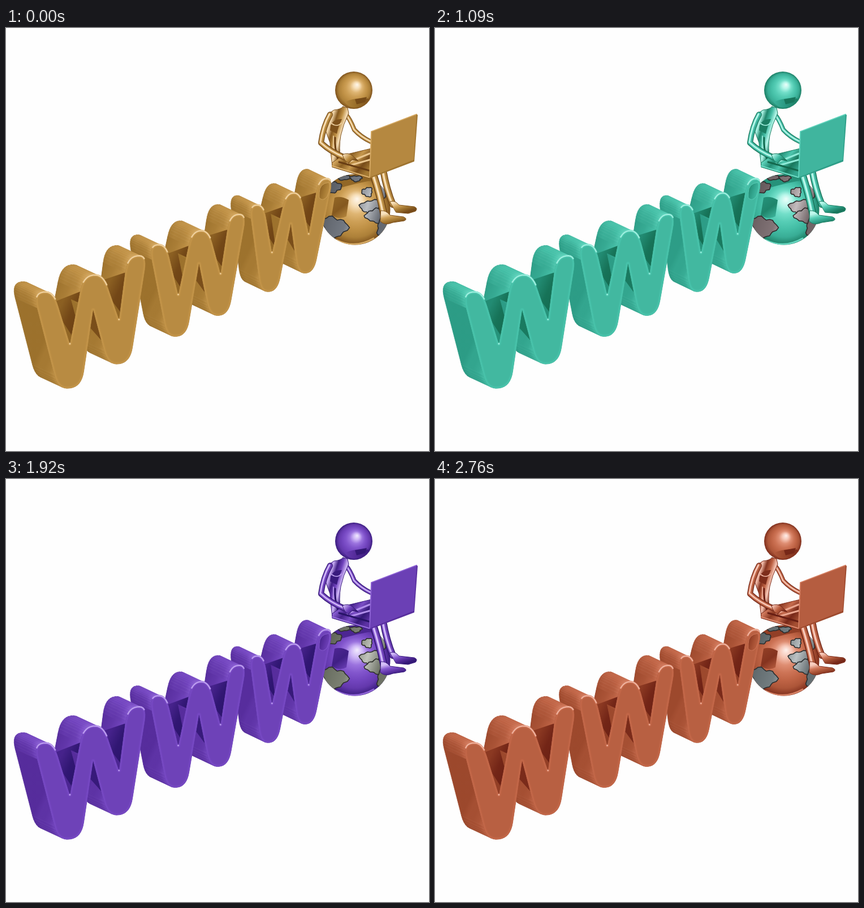
Recreate the animation shown at these times as an HTML page with a canvas. Size 748 by 748 pixels, loop 2920 ms.

```html
<!DOCTYPE html>
<html>
<head>
<meta charset="utf-8">
<style>
html, body { margin: 0; width: 100%; height: 100%; overflow: hidden; background: #fefefe; }
canvas { display: block; width: 748px; height: 748px; }
</style>
</head>
<body>
<canvas id="stage" width="748" height="748"></canvas>
<script>
const g = document.getElementById('stage').getContext('2d');
const LOOP = 2920;
const HUES = [[0, 37], [4, 119], [7, 168], [15, 319], [17, 375]];
let hue;

// Six colour steps per second, on a 10 ms clock.
const stepAt = t => Math.ceil((3 * Math.floor(t / 10) + 25) / 50) - 1;

function hueAt(step) {
  const k = Math.max(1, HUES.findIndex(p => p[0] >= step));
  const [a, h] = HUES[k - 1], [b, j] = HUES[k];
  return h + (j - h) * (step - a) / (b - a);
}

// Metal gains saturation away from its base tone; dark tones lean to the side.
const metal = l => `hsl(${hue - Math.max(0, 38 - l) * .5} ${47 + Math.abs(l - 49) * .9}% ${l}%)`;
const stone = l => `hsl(${hue + 180} 6% ${l}%)`;

const poly = pts => 'M' + pts.map(p => p.join()).join('L') + 'Z';
const mix = (p, q, t) => [p[0] + (q[0] - p[0]) * t, p[1] + (q[1] - p[1]) * t];

function fill(d, paint, edge, width = 1) {
  g.fillStyle = paint;
  g.fill(new Path2D(d));
  if (edge) line(d, edge, width);
}
function line(d, paint, width) {
  g.strokeStyle = paint;
  g.lineWidth = width;
  g.stroke(new Path2D(d));
}
// Evenly spaced tones, either metal or stone.
function tones(grad, list, tint = metal) {
  list.forEach((l, i) => grad.addColorStop(i / (list.length - 1), tint(l)));
  return grad;
}
const linear = (p, q, list, tint) => tones(g.createLinearGradient(...p, ...q), list, tint);

function ball(x, y, r, hx, hy) {
  g.fillStyle = tones(g.createRadialGradient(hx, hy, 0, x, y, r), [96, 84, 66, 57, 51, 45, 30]);
  g.beginPath();
  g.arc(x, y, r, 0, 7);
  g.fill();
}
function limb(d, w) {
  line(d, metal(26), w);
  line(d, metal(47), w * .78);
  g.save();
  g.translate(-w * .1, -w * .08);
  line(d, metal(66), w * .42);
  line(d, metal(88), w * .18);
  g.restore();
}

// Ends and turns of the zigzag, left to right.
const NODES = [[66, 467], [113, 637], [154, 437], [200, 594], [232, 403]];

function outline() {
  const cap = ([x, y], side, w) => [-w, w].map(d => [x + d * side, y - d * side * .14, 27]);
  const corners = [
    ...NODES.flatMap((p, i) => i % 2 ? [[p[0], p[1] - 77, 3]] : cap(p, 1, 17.5)),
    ...cap(NODES[3], -1, 19.5),
    [NODES[2][0], NODES[2][1] + 60, 3],
    ...cap(NODES[1], -1, 20.5)
  ];
  return corners.flatMap((p, i) => {
    const n = corners.length;
    const [a, b] = [corners[(i + n - 1) % n], corners[(i + 1) % n]].map(q => {
      const len = Math.hypot(q[0] - p[0], q[1] - p[1]);
      return mix(p, q, Math.min(p[2] / len, .48));
    });
    return Array.from({ length: 9 }, (_, k) => mix(mix(a, p, k / 8), mix(p, b, k / 8), k / 8));
  });
}
const OUTLINE = outline();

// Letter n shrinks along the row; z runs from the front (0) to the back (1).
function project(n, [x, y], z) {
  const run = n * (203 - 13 * n), dx = x - 107, dy = y - 636;
  return [
    107 + run + .845 ** n * dx - .033 * n * dy + z * (2 * n - 39),
    636 - .483 * run + (.05 - .01 * n) * n * dx + (1 - .058 * n) * dy + z * (.7 * n - 18.2)
  ];
}

function letter(n) {
  const front = OUTLINE.map(p => project(n, p, 0));
  const back = OUTLINE.map(p => project(n, p, 1));
  const face = poly(front);
  const depth = [back[0][0] - front[0][0], back[0][1] - front[0][1]];
  let shine = '';
  front.forEach((p, i) => {
    const j = (i + 1) % front.length;
    const q = front[j], P = back[i], Q = back[j];
    const len = Math.hypot(q[0] - p[0], q[1] - p[1]) || 1;
    const nx = (q[1] - p[1]) / len, ny = (p[0] - q[0]) / len;
    if (ny < -.45) shine += `M${p}L${q}`;
    if (nx * depth[0] + ny * depth[1] <= 0) return;
    const inner = len > 40 && ny < 0;
    const l = 43 + (ny < 0 ? -9 : -3) * ny;
    const paint = linear(p, P, inner ? [25, 27, 34] : [l + 9, l + 2, l, l, l - 3]);
    fill(poly([p, q, Q, P]), paint, paint, .8);
    if (inner) {
      fill(poly([p, mix(p, q, .15), mix(P, Q, .5), P]), metal(36));
      fill(poly([q, Q, mix(Q, P, .4)]), linear(q, Q, [52, 44, 40]));
    }
  });
  fill(poly([[154, 497], [147, 528], [171, 555]].map(p => project(n, p, 0))), metal(29));
  fill(face, metal(49));
  g.save();
  g.clip(new Path2D(face));
  line(face, metal(51), 7);
  line(face, metal(54), 3);
  g.restore();
  line(face, metal(46), .6);
  line(shine, metal(66), 3.2);
  line(shine, metal(82), 1.3);
}

// A ragged patch of land.
function land(x, y, rx, ry, paint) {
  const pts = Array.from({ length: 26 }, (_, i) => {
    const a = i * Math.PI / 13;
    const r = 1 + .17 * Math.sin(3 * a + x) + .1 * Math.sin(7 * a + y);
    return [x + rx * r * Math.cos(a), y + ry * r * Math.sin(a)];
  });
  fill(poly(pts), paint, stone(17), 1.6);
}

function globe() {
  ball(617, 321, 62.5, 621, 302);
  g.save();
  g.beginPath();
  g.arc(617, 321, 62.5, 0, 7);
  g.clip();
  fill('M581,300Q592,296 606,304L602,333Q590,340 576,331Z', linear([580, 300], [606, 335], [36, 32, 50]));
  fill('M566,270Q610,250 660,268Q625,272 580,286Z', metal(36));
  const paint = linear([560, 290], [665, 325], [34, 42, 48, 75, 42], stone);
  land(580, 353, 22, 19, paint);
  land(645, 317, 17, 13, paint);
  land(652, 332, 15, 12, paint);
  land(639, 290, 9, 8, paint);
  land(667, 354, 11, 15, paint);
  land(580, 281, 12, 10, paint);
  land(598, 264, 11, 5, paint);
  land(619, 266, 10, 5, paint);
  land(664, 285, 9, 16, paint);
  line('M585,375Q617,391 650,372', metal(62), 3);
  g.restore();
}

function person() {
  // Far arm, legs and feet
  limb('M601,153Q608,160 616,180Q628,193 645,201', 8);
  limb('M667,252Q673,286 684,312', 12);
  fill('M679,307Q688,304 695,313L722,316Q729,319 724,324L711,328L690,326Z', linear([690, 308], [697, 329], [84, 58, 40, 28]), metal(30));
  limb('M650,260Q661,294 668,329', 13);
  fill('M663,323Q672,322 679,331L703,334Q711,338 704,341L684,344Q670,350 662,342Z', linear([680, 326], [685, 347], [86, 58, 42, 28]), metal(30));

  // Torso
  fill('M596,139L604,141L606,151Q596,171 592,190Q588,211 592,237L577,244Q574,222 573,203L563,176Q562,154 580,145Q592,144 596,139Z',
    linear([564, 170], [602, 182], [46, 82, 32, 50, 84, 34]), metal(30));
  fill('M574,172Q580,160 594,161Q587,176 585,187L573,181Z', metal(30));
  line('M576,169Q585,176 593,168M579,191L578,229', metal(80), 1.6);
  line('M582,194Q581,213 587,232', metal(25), 3);

  // Laptop base, lap and near arm
  fill('M577,238L596,225L646,213L643,266L577,246Z', linear([590, 226], [632, 262], [60, 34, 54, 28, 42]), metal(30));
  line('M604,238L643,222M608,243L643,233', metal(74), 3);
  line('M589,237L642,252', metal(24), 3);
  line('M577,244L642,264', metal(64), 2);
  limb('M573,153Q561,174 557,203Q574,219 599,229', 10);
  fill('M595,224Q605,219 613,226L623,235L612,233L606,239Q598,236 595,224Z', linear([597, 224], [613, 239], [84, 50, 28]), metal(28));

  // Screen
  fill('M646,183L726,152L728,154L722,236L643,266Z', metal(40));
  fill('M646,184L726,153L721,233L643,264Z', metal(48));
  line('M643,264L646,183L726,152.5', metal(62), 1.8);

  // Head
  ball(615, 110, 33, 621, 100);
  fill('M599,131Q617,122 642,125Q635,139 616,141Q605,140 599,131Z', linear([600, 130], [640, 134], [46, 38, 30]));
  fill('M617,126L638,122L635,131L620,135Z', metal(28));
}

function draw(step) {
  hue = hueAt(step);
  g.fillStyle = '#fefefe';
  g.fillRect(0, 0, 748, 748);
  g.lineCap = g.lineJoin = 'round';
  globe();
  for (let n = 2; n >= 0; n--) letter(n);
  fill('M554,291Q554,275 571,273Q575,281 568,298Q560,308 554,300Z', linear([554, 285], [572, 290], [34, 42, 50]), metal(58));
  person();
}

let shown = -1;
function tick() {
  const step = stepAt(performance.now() % LOOP);
  if (step !== shown) draw(shown = step);
  requestAnimationFrame(tick);
}
tick();
</script>
</body>
</html>
```
